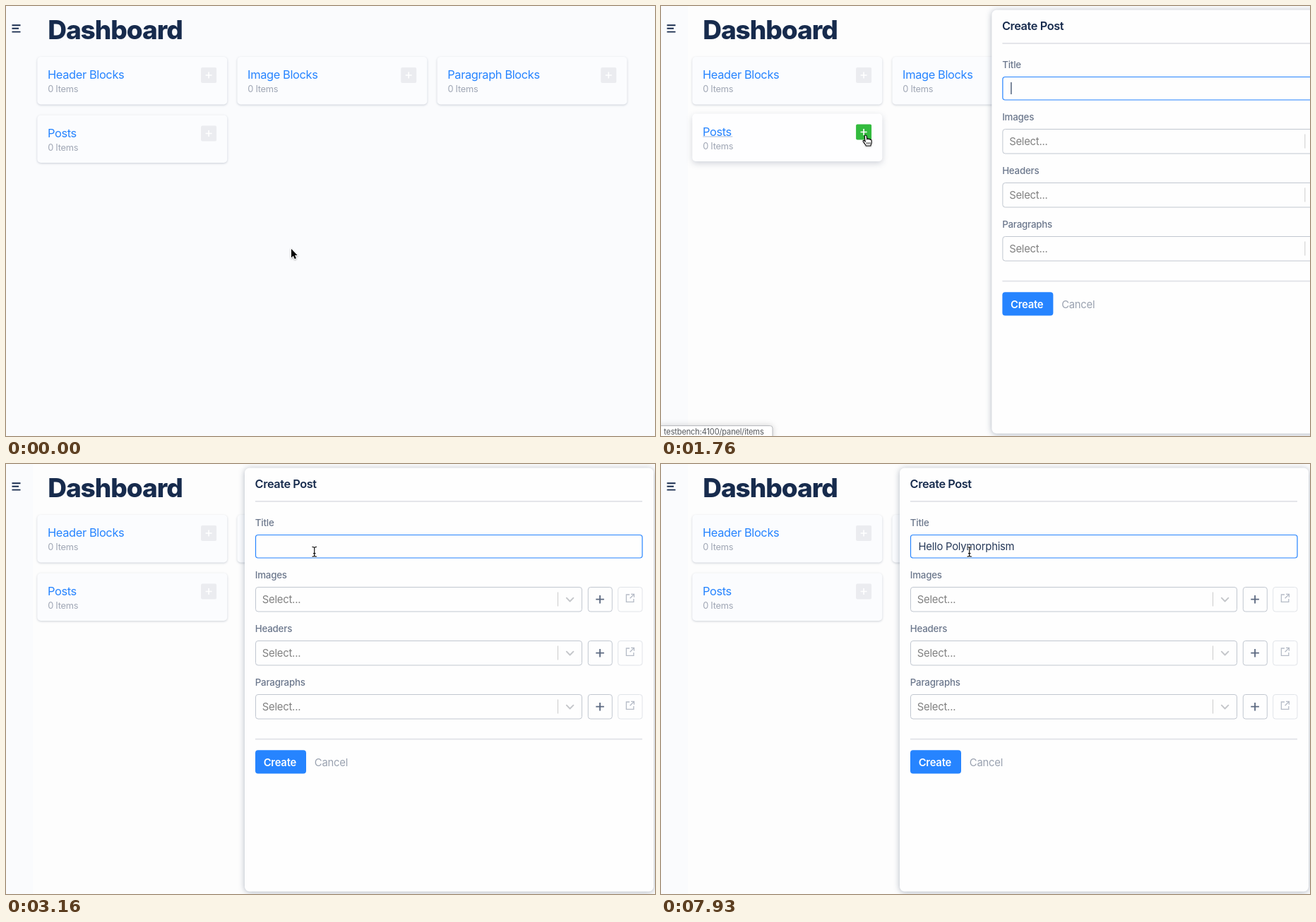
Write an HTML page that moves like this. It is 919x609 px and loops after 8 s.

```html
<!DOCTYPE html>
<html lang="en">
<head>
<meta charset="utf-8">
<title>Dashboard</title>
<style>
  html, body { margin: 0; width: 100%; height: 100%; overflow: hidden; background: #fafbfd; }
  svg { display: block; width: 919px; height: 609px; overflow: hidden; }
  text { font: 400 14.8px Inter, "Liberation Sans", sans-serif; font-optical-sizing: none; letter-spacing: -.015em; white-space: pre; }
  .h1 { font-size: 37px; font-weight: 800; letter-spacing: -.028em; fill: #172b4d; }
  .name { font-size: 16.4px; letter-spacing: -.022em; fill: #2684ff; }
  .count { font-size: 12.8px; letter-spacing: -.02em; fill: #a0a7b5; }
  .card > rect:first-child { fill: #fbfcfe; filter: drop-shadow(0 1px 1.4px rgba(9, 30, 66, .2)); }
  .card .add { fill: #ebecf0; }
  .card .line { display: none; }
  .card.hover > rect:first-child { fill: #fefeff; filter: drop-shadow(0 3px 4px rgba(9, 30, 66, .18)); }
  .card.hover .line { display: inline; }
  .card.ready .add { fill: #33bb3e; }
  .url { font-size: 11.1px; fill: #55585c; }
  .status { fill: #fff; stroke: #b9bbbf; filter: drop-shadow(0 0 4px rgba(0, 0, 0, .18)); }
  .sheet { fill: #fefefe; filter: drop-shadow(0 1px 4px rgba(9, 30, 66, .32)); }
  .title { font-size: 16.3px; font-weight: 600; letter-spacing: -.025em; fill: #172b4d; }
  .label { font-size: 13.3px; font-weight: 500; fill: #6b778c; }
  .hint { fill: #808080; }
  .box { fill: #fefefe; stroke: #c1c7d0; }
  .faint { stroke: #e1e4e9; }
  .focus { stroke: #2684ff; stroke-width: 1.2; }
  .stroke { fill: none; }
</style>
</head>
<body>
<svg id="stage" viewBox="0 0 919 609" xmlns="http://www.w3.org/2000/svg"></svg>
<script>
const stage = document.getElementById('stage');
const $ = id => document.getElementById(id);

const text = (x, y, cls, str, extra = '') => `<text x="${x}" y="${y}" class="${cls}" ${extra}>${str}</text>`;
const rect = (x, y, w, h, r, cls, extra = '') =>
  `<rect x="${x}" y="${y}" width="${w}" height="${h}" rx="${r}" class="${cls}" ${extra}/>`;
const path = (d, color, width, extra = '') =>
  `<path d="${d}" class="stroke" stroke="${color}" stroke-width="${width}" ${extra}/>`;

const card = (col, y, name, id) => `
  <g transform="translate(${44.3 + col * 283.1} ${y})"><g class="card" id="${id}">
    ${rect(0, 0, 269, 67.5, 5, '')}
    ${text(14.7, 31, 'name', name)}
    ${rect(15, 32, 42, 1, 0, 'line', 'fill="#a9bddb"')}
    ${text(14.9, 50, 'count', '0 Items')}
    ${rect(231.8, 15, 22, 22, 2, 'add')}
    ${path('M238.3 26h9M242.8 21.5v9', '#fff', 1.6)}
  </g></g>`;

// Panel parts are placed relative to the panel's left edge.
const relation = (name, i) => `
  <g transform="translate(0 ${i * 76})">
    ${text(14.8, 162, 'label', name)}
    ${rect(15.5, 174.5, 462, 34.5, 3.5, 'box')}
    ${text(24.8, 197, 'hint', 'Select...')}
    ${path('M443.5 181.5v20', '#ccc', 1)}
    ${path('M455.8 189.7l4.8 4.8 4.8-4.8', '#c4c6ca', 1.9, 'stroke-linecap="round" stroke-linejoin="round"')}
    ${rect(486.3, 174.5, 34, 34.5, 3.5, 'box')}
    ${path('M497.3 191.7h11.6M503.1 185.9v11.6', '#5b6880', 1.8)}
    ${rect(528.7, 174.5, 34.3, 34.5, 3.5, 'box faint')}
    ${path('M545 185h-4.6v10.4h10.4V191M547 184.4h4.4v4.4M551 184.8l-5.4 5.4', '#b6bcc7', 1.3)}
  </g>`;

stage.innerHTML = `
  <rect id="tint" x="38" width="881" height="609" fill="#fdfdfd"/>
  ${path('M8.5 27.2h12M8.5 31.8h9.5M8.5 36.6h12', '#172b4d', 1.9)}
  ${text(59.2, 47.3, 'h1', 'Dashboard')}
  ${card(0, 72, 'Header Blocks', 'headers')}
  ${card(1, 72, 'Image Blocks', 'images')}
  ${card(2, 72, 'Paragraph Blocks', 'paragraphs')}
  ${card(0, 154.5, 'Posts', 'posts')}
  <g id="status">
    <path class="status" d="M-2 594.5H154.5q3.5 0 3.5 3.5V612H-2z"/>
    ${text(4, 607, 'url', 'testbench:4100/panel/items')}
  </g>
  <g id="panel">
    ${rect(0, 5.5, 579, 600, 7, 'sheet')}
    ${text(14.6, 34, 'title', 'Create Post')}
    ${rect(15, 52, 548, 1.8, 0, '', 'fill="#e1e3e8"')}
    ${text(14.8, 88, 'label', 'Title')}
    ${rect(15.5, 100.5, 547.5, 32.5, 3.5, 'box focus')}
    ${text(26.5, 122, '', '', 'id="entry" fill="#253858"')}
    ${rect(0, 108, 1.1, 17, 0, '', 'id="caret" fill="#172b4d"')}
    ${['Images', 'Headers', 'Paragraphs'].map(relation).join('')}
    ${rect(15, 388.7, 548, 1.8, 0, '', 'fill="#e1e3e8"')}
    ${rect(15, 405.3, 72, 33.2, 4, '', 'fill="#2684ff"')}
    ${text(26.7, 427.5, '', 'Create', 'fill="#fff" font-weight="600" style="font-weight:600"')}
    ${text(98.8, 427.5, '', 'Cancel', 'fill="#9aa2b0"')}
  </g>
  <g id="arrow" style="filter:drop-shadow(0 1px 1px rgba(0,0,0,.3))">
    <path d="M0 0V12.4L2.8 9.8L4.8 14.2L6.9 13.3L5 9H8.6Z" stroke="#fff" stroke-width="1.6" paint-order="stroke"/>
  </g>
  <g id="hand" style="filter:drop-shadow(0 1px 1px rgba(0,0,0,.25))">
    <path d="M-1.4 1.2c0-1.7 2.6-1.7 2.8 0l.6 4.3c.5-.9 2-.8 2.3.2 .7-.7 2-.4 2.2.6 .9-.5 1.9 0 1.9 1.2v3.3c0 1.6-1 2-1.2 4.2H.6c-.4-2-3-4.3-4.1-6.2-.5-1.2 1-1.9 1.9-1l1 1.1z" fill="#fff" stroke="#000" stroke-width="1.1"/>
    ${path('M1.9 10v2.8M4 10v2.8M6.1 10v2.8', '#000', .8)}
  </g>
  <g id="beam">
    ${['#fff', '#111'].map((c, i) =>
      path('M-3.2-6.7Q-.4-6.7 0-5.3Q.4-6.7 3.2-6.7M0-5.3V5.8M-3.2 7.2Q-.4 7.2 0 5.8Q.4 7.2 3.2 7.2M-1.8 2.6h3.6', c, i ? 1.2 : 2.6)).join('')}
  </g>`;

const LOOP = 8000;
const TITLE = 'Hello Polymorphism';
const keyTimes = [3640, 3910, 4000, 4080, 4320, 4470, 4680, 4880, 5060, 5300,
  5540, 5600, 5750, 5840, 5930, 6110, 6410, 7450];
const slideTimes = [1600, 1680, 1760, 1850, 1940];
const caretOff = [[2140, 2650], [3160, 3640], [6970, 7450], [7930, LOOP]];

const START = [404, 344], BUTTON = [289.7, 183], FIELD = [436.7, 124];
const smooth = p => p * p * (3 - 2 * p);
const within = (t, [a, b]) => t >= a && t < b;
const show = (id, on) => $(id).style.display = on ? '' : 'none';

// Progress in `count` equal jumps, the first at `from` and the last at `to`.
function stepped(t, from, to, count) {
  if (t < from) return 0;
  const k = Math.floor((t - from) / (to - from) * (count - 1) + 1e-6) + 1;
  return smooth(Math.min(k, count) / count);
}

const mix = (a, b, p) => a.map((v, i) => v + (b[i] - v) * p);

function drawPointer(t) {
  const leave = stepped(t, 2140, 2750, 10);
  const [x, y] = leave ? mix(BUTTON, FIELD, leave) : mix(START, BUTTON, stepped(t, 390, 1110, 12));
  const hover = !leave && y < 222;
  const typing = leave && y < 133;
  const kind = hover ? 'hand' : typing ? 'beam' : 'arrow';
  for (const id of ['arrow', 'hand', 'beam']) show(id, id === kind);
  $(kind).setAttribute('transform', `translate(${x} ${y})`);

  const posts = $('posts');
  posts.setAttribute('class', 'card' + (hover ? ' hover' : '') + (hover && y < 191 ? ' ready' : ''));
  posts.setAttribute('transform', `translate(0 ${hover ? -2 : 0})`);
}

function drawPanel(t) {
  const now = slideTimes.filter(s => s <= t).pop();
  show('tint', t >= 1520);
  show('panel', now);
  if (!now) return;
  const rest = 1 - (now - 1560) / 380;
  $('panel').setAttribute('transform', `translate(${338 + 581 * rest * rest} 0)`);
}

function drawEntry(t) {
  const typed = TITLE.slice(0, keyTimes.filter(k => k <= t).length);
  const entry = $('entry');
  entry.textContent = typed + (within(t, [6490, 7150]) ? 'n' : '');
  $('caret').setAttribute('x', 27 + entry.getComputedTextLength());
  show('caret', !caretOff.some(span => within(t, span)));
}

function frame(now) {
  const t = now % LOOP;
  drawPointer(t);
  drawPanel(t);
  drawEntry(t);
  $('status').style.opacity = within(t, [1340, 2280]) ? 1 : within(t, [1280, 2350]) ? .5 : 0;
  requestAnimationFrame(frame);
}

const origin = performance.now();
requestAnimationFrame(function tick(now) { frame(Math.max(0, now - origin)); });
</script>
</body>
</html>
```
